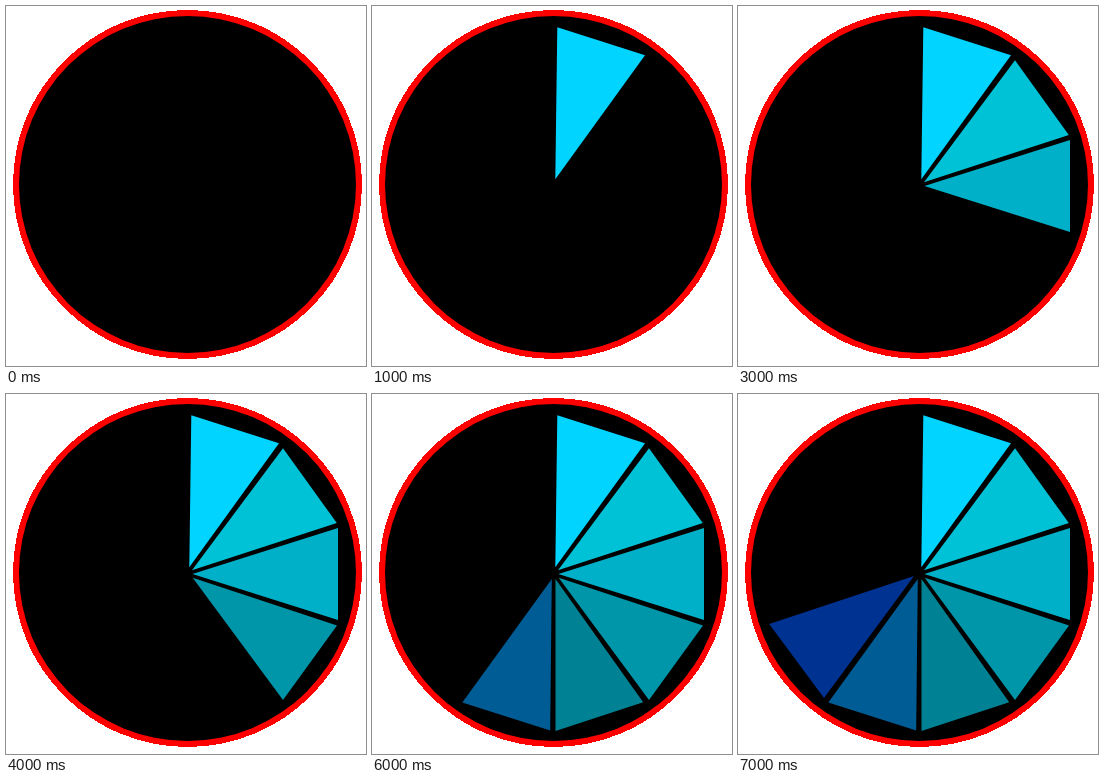
Recreate the animation shown at these times as an HTML page. Size 360 px wide and 360 px high, loop 8 s.

```html
<!DOCTYPE html>
<html lang="en">
<head>
<meta charset="utf-8">
<title>Wheel</title>
<style>
  @property --n {
    syntax: "<integer>";
    inherits: true;
    initial-value: 0;
  }
  html, body { margin: 0; width: 100%; height: 100%; overflow: hidden; background: #fff; }
  svg {
    display: block;
    width: 100%;
    height: 100%;
    animation: count 8s steps(8) infinite;
  }
  /* Each wedge shows once the count passes its index */
  polygon { opacity: clamp(0, var(--n) - var(--i), 1); }
  @keyframes count { from { --n: 0; } to { --n: 8; } }
</style>
</head>
<body>
<svg viewBox="0 0 360 360">
  <circle cx="181.5" cy="178.5" r="174.5" fill="#f00" shape-rendering="crispEdges"/>
  <circle cx="181.5" cy="178.5" r="168.5"/>
  <polygon style="--i:0" fill="#00d4ff" points="185.3,21.3 273,49.2 183.3,173.3"/>
  <polygon style="--i:1" fill="#00c2d7" points="277,54.2 330.8,129 186,176.2"/>
  <polygon style="--i:2" fill="#00b0c8" points="332,134 332,226 186.4,180"/>
  <polygon style="--i:3" fill="#0096aa" points="331,231.5 277,306 186.7,183.7"/>
  <polygon style="--i:4" fill="#008294" points="271.2,308.2 183.5,337 183.5,185"/>
  <polygon style="--i:5" fill="#005c94" points="178.2,336.6 90.3,308.4 179.8,185"/>
  <polygon style="--i:6" fill="#003292" points="86,304 31.2,230 176,182"/>
</svg>
</body>
</html>
```
